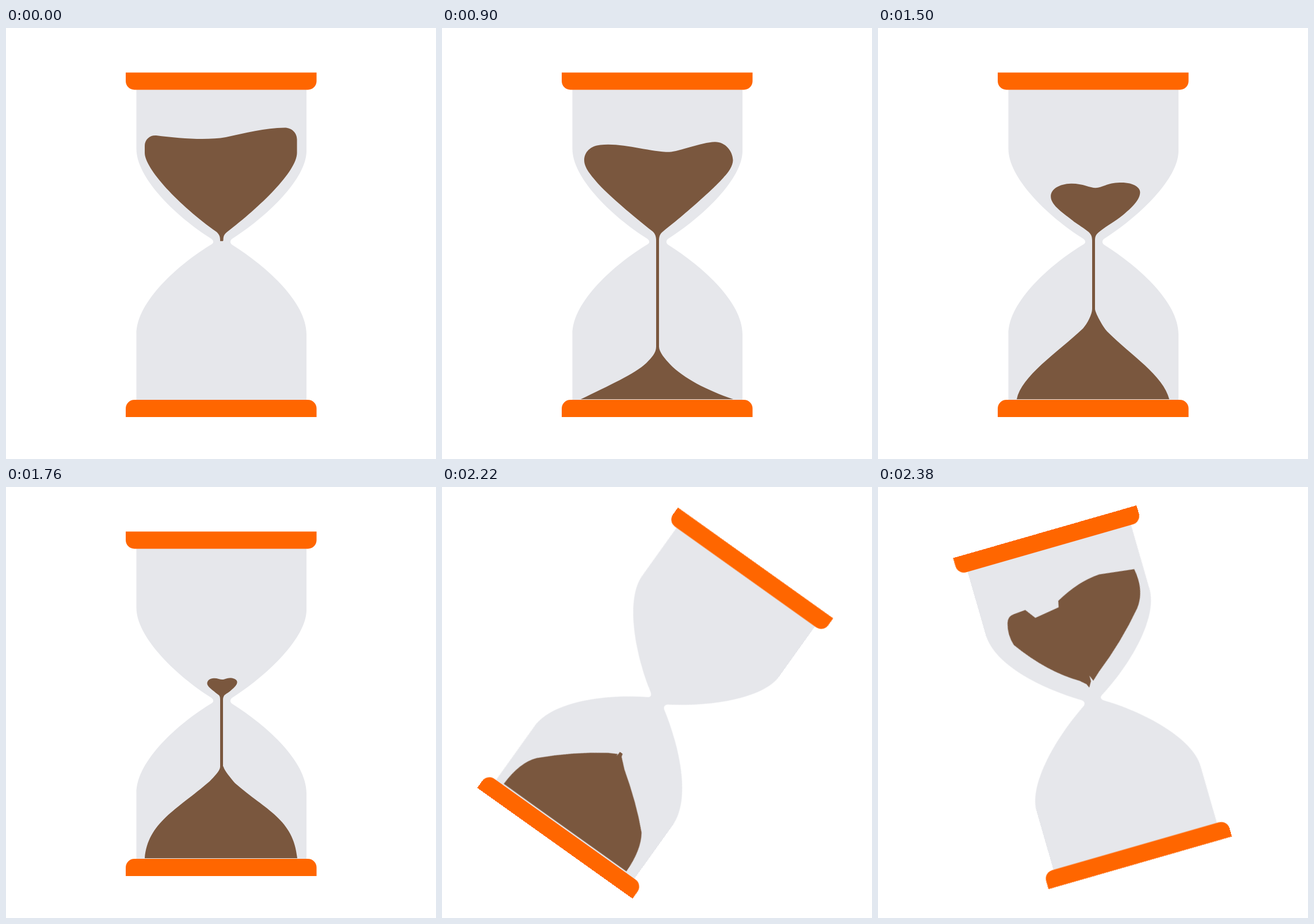
An HTML page without scripts for the animation above (2.4 s loop, 747x750 px).

```html
<!DOCTYPE html>
<html lang="en">
<head>
<meta charset="utf-8">
<title>Hourglass</title>
<style>
  html, body { margin: 0; width: 100%; height: 100%; overflow: hidden; background: #fff; }
  svg { display: block; width: 100%; height: 100%; }

  .hourglass, .running, .tumbling, .upper, .stream, .pile {
    animation: 2.4s linear infinite;
  }
  .hourglass { transform-origin: 374px 371.5px; animation-name: turn; }
  .glass { fill: #e6e7eb; }
  .cap { fill: #ff6600; }
  .sand { fill: #7a573e; }
  .running { animation-name: run; }
  .tumbling { opacity: 0; animation-name: appear, tumble; }
  .upper { animation-name: drain; }
  .stream { animation-name: pour; }
  .pile { animation-name: grow; }

  @keyframes turn {
    0%, 90.78% { transform: rotate(0deg); }
    90.79% { transform: rotate(3.45deg); animation-timing-function: steps(11, end); }
    100% { transform: rotate(180deg); }
  }

  @keyframes run {
    0%, 90.78% { opacity: 1; }
    90.79%, 100% { opacity: 0; }
  }

  @keyframes appear {
    0%, 90.78% { opacity: 0; }
    90.79%, 100% { opacity: 1; }
  }

  @keyframes drain {
    0%, 17.1% {
      d: path("M241 205 C241 194 250 186 261 187 C300 192 348 196 382 190 C415 183 450 174 484 173.5 C497 173.5 505.5 183 505.5 194 C505.5 201 505.5 210 505.5 217 C505.5 250 440 312 384 355 C379 359 377.5 362 377.5 370 L372 370 C372 362 370 359 366 355 C300 308 241 245 241 217 C241 213 241 209 241 205Z");
    }
    21.667% {
      d: path("M242 212 C242 199 250 191 261 192 C300 198 345 201 378 196 C410 189 450 179 484 178.5 C497 179 505.5 190 505.5 203 C505.5 212 504 222 502 230 C494 258 430 318 384 354 C379 358 377 362 377 370 L372 370 C372 362 370 358 366 354 C300 305 250 262 246 232 C243 224 242 218 242 212Z");
    }
    37.5% {
      d: path("M247 230 C247 216 258 205 275 203.5 C312 199 360 215.5 395 215.8 C412 215 450 199 474 198.3 C492 198 505 214 505.5 230 C505.5 240 497 252 490 259 C482 270 430 318 384 354 C379 358 377 362 377 370 L372 370 C372 362 370 358 366 354 C330 326 292 293 274 274 C258 256 247 243 247 230Z");
      animation-timing-function: cubic-bezier(.333, .147, .667, .467);
    }
    62.5% {
      d: path("M300 293 C300 280 315 271 335 270.5 C355 270 368 278 378 278 C390 278 398 269 420 268.8 C445 268 456 278 455.5 286 C455 300 440 313 425 326 C412 337 400 342 384 355 C379 359 377 362 377 370 L372 370 C372 362 370 359 366 355 C352 344 345 341 338 335 C325 324 300 309 300 293Z");
    }
    78.333% {
      d: path("M372 364 C372 362 373 361 373 361 C373 361 374 361 374.5 361 C375 361 376 361 376 361 C377 362 377 363 377 364 C377 365 377 365 377 365 C377 366 377 366 377 366 C377 368 377 370 377 370 L372 370 C372 368 372 366 372 366 C372 366 372 365 372 365 C372 365 372 364 372 364Z");
      transform: translateY(0);
    }
    84.167%, 100% {
      d: path("M372 364 C372 362 373 361 373 361 C373 361 374 361 374.5 361 C375 361 376 361 376 361 C377 362 377 363 377 364 C377 365 377 365 377 365 C377 366 377 366 377 366 C377 368 377 370 377 370 L372 370 C372 368 372 366 372 366 C372 366 372 365 372 365 C372 365 372 364 372 364Z");
      transform: translateY(125px);
    }
    0%, 62.5% { transform: translateY(0); }
  }

  @keyframes pour {
    0% { y: 366px; height: 4px; }
    14.167%, 78.333% { y: 366px; height: 280px; }
    84.167%, 100% { y: 486px; height: 20px; }
  }

  @keyframes grow {
    0%, 14.167% {
      d: path("M241 646 C285 646 325 646 347 646 C358 646 372 646 372 646 C372 646 377 646 377 646 C377 646 388 646 403 646 C425 646 465 646 506 646Z");
    }
    21.667% {
      d: path("M241 646 C285 638 325 633 347 627 C358 623 372 616 372 608 C372 608 377 608 377 608 C377 616 388 624 403 627 C425 633 465 638 506 646Z");
    }
    37.5% {
      d: path("M241 646 C290 622 335 602 355 583 C364 574 372 566 372 555 C372 555 377 555 377 555 C377 564 388 577 396 585 C420 610 460 630 506 646Z");
      animation-timing-function: cubic-bezier(.333, .4, .667, .75);
    }
    62.5% {
      d: path("M241 646 C249 606 310 566 356 523 C364 514 372 498 372 489 C372 489 377 489 377 489 C377 495 390 519 398 528 C440 570 496 605 506 646Z");
    }
    84.167%, 100% {
      d: path("M241 646 C244 562 282 558 352 501 C358 495 372 490 372 485 C372 481 379 481 379 486 C382 491 390 494 398 503 C465 556 503 552 506 646Z");
    }
  }

  /* The heap loosens and slides toward the neck while the glass turns over. */
  @keyframes tumble {
    0%, 90.79% {
      d: path("M241 646 Q242 598 262 576 Q306 531 357 497 L372 489 L373 489 L373 482 L378 482 L379 488 L398 503 Q450 538 487 575 Q505 600 506 646 Q497 646 480 646 L460 646 L440 646 L395 646 L390 646 Q340 646 300 646Z");
      animation-timing-function: cubic-bezier(.5, 0, .8, .6);
    }
    95.79% {
      d: path("M244 633 Q244 593 261 564 Q316 512 359 483 L372.5 472 L373 507 L375 481 L387.5 483 L393 481 L394 499 Q432 534 471 567 Q484 590 480.5 635 Q477 635 465 635 L444 635 L431 635 L388 634 L385 634 Q341 634 303 634Z");
    }
    99.125%, 100% {
      d: path("M242.5 571.5 Q235.5 531 256.5 504.5 Q299 456 350.5 417 L364.5 404.5 L368.5 415 L368.5 405 L374.5 395 L377.5 402 L387.5 411 Q438 442 480 502.5 Q486 522 480 542 Q476.5 553.5 465 554 L444 555.5 L431 537.5 L387 544 L384.5 555 Q341.5 578 303.5 579.5Z");
    }
  }
</style>
</head>
<body>
<svg viewBox="0 0 747 750">
  <g class="hourglass">
    <path class="glass" d="M226.5 107V210C226.5 262 297 329 357 367C361 370 361 374 357 376.5C300 411 226.5 476 226.5 533V648H522V533C522 476 451 414 392.5 377C389 374 389 370 392.5 367C455 327 522 262 522 214V107Z"/>
    <g class="sand">
      <g class="running">
        <path class="upper"/>
        <rect class="stream" x="372" width="5"/>
        <path class="pile"/>
      </g>
      <path class="tumbling"/>
    </g>
    <path class="cap" d="M208 77.5H539.5V92.5a15 15 0 0 1-15 15H223a15 15 0 0 1-15-15Z"/>
    <path class="cap" d="M208 677H539.5V662a15 15 0 0 0-15-15H223a15 15 0 0 0-15 15Z"/>
  </g>
</svg>
</body>
</html>
```
